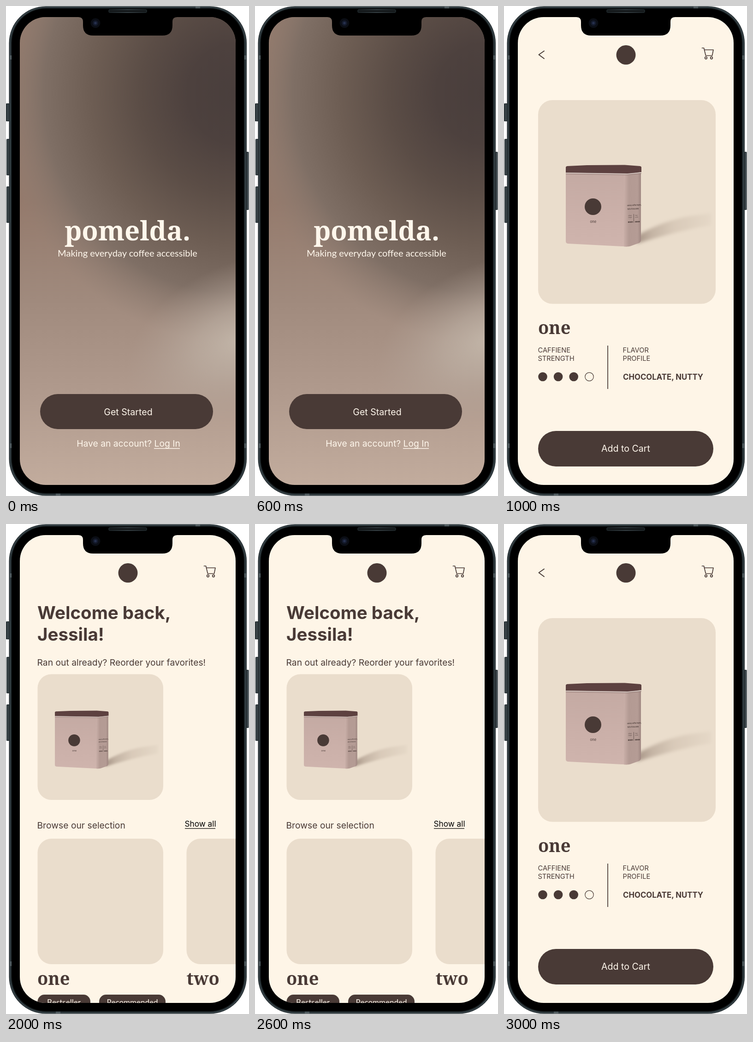
Write an HTML page that moves like this. It is 527 px wide and 1062 px high and loops after 4 s.

```html
<!DOCTYPE html>
<html lang="en">
<head>
<meta charset="utf-8">
<title>Coffee app</title>
<style>
  html, body { margin: 0; width: 100%; height: 100%; overflow: hidden; background: #fff; }
  svg { display: block; width: 100vw; height: 100vh; }
  text { font-family: Inter, sans-serif; font-size: 19.3px; fill: #493a36; }
  .serif { font-family: "Noto Serif", serif; font-weight: 900; font-size: 38px; }
  .lato { font-family: Lato, sans-serif; font-size: 20.1px; }
  .mid { text-anchor: middle; }
  .light { fill: #fff7ec; }
  .btn { font-size: 19.6px; }
  .label { font-size: 14.7px; }
  .head { font-size: 38.5px; font-weight: 700; }
  .dark { fill: #493a36; }
  .card { fill: #eaddcc; }
  .line { fill: none; stroke: #493a36; stroke-width: 1.7; stroke-linejoin: round; stroke-linecap: round; }
  .tiny { font-size: 3px; }
  .note { font-size: 4.3px; font-weight: 700; }

  .scene { visibility: hidden; animation: 4s step-end infinite; }
  .welcome { animation-name: welcome; }
  .product { animation-name: product; }
  .shop { animation-name: shop; }
  @keyframes welcome { 0% { visibility: visible } 25%, 100% { visibility: hidden } }
  @keyframes product {
    0% { visibility: hidden } 25% { visibility: visible }
    50% { visibility: hidden } 75%, 100% { visibility: visible }
  }
  @keyframes shop { 0% { visibility: hidden } 50% { visibility: visible } 75%, 100% { visibility: hidden } }
</style>
</head>
<body>
<svg viewBox="0 0 527 1062" preserveAspectRatio="none">
  <defs>
    <clipPath id="screen"><rect x="30" y="24" width="468" height="1014" rx="56"/></clipPath>

    <linearGradient id="base" x2="0" y2="1">
      <stop offset="0" stop-color="#967b6c"/>
      <stop offset=".4" stop-color="#947a6c"/>
      <stop offset=".6" stop-color="#a08a7d"/>
      <stop offset=".8" stop-color="#b19b8e"/>
      <stop offset="1" stop-color="#c4ae9f"/>
    </linearGradient>
    <radialGradient id="dusk" gradientUnits="userSpaceOnUse" cx="0" cy="0" r="1"
      gradientTransform="translate(498 190) scale(520 540)">
      <stop offset="0" stop-color="#493e3c"/>
      <stop offset=".2" stop-color="#4d413e"/>
      <stop offset=".4" stop-color="#5b4d46"/>
      <stop offset=".6" stop-color="#6d5d53"/>
      <stop offset=".8" stop-color="#7f6f65"/>
      <stop offset="1" stop-color="#917f74" stop-opacity="0"/>
    </radialGradient>
    <radialGradient id="glow" gradientUnits="userSpaceOnUse" cx="0" cy="0" r="1"
      gradientTransform="translate(508 725) rotate(-25) scale(260 165)">
      <stop offset="0" stop-color="#c2b5a8"/>
      <stop offset=".4" stop-color="#bbada1" stop-opacity=".7"/>
      <stop offset="1" stop-color="#b0a095" stop-opacity="0"/>
    </radialGradient>

    <linearGradient id="front" x2="0" y2="1">
      <stop offset="0" stop-color="#c4aaa3"/>
      <stop offset=".6" stop-color="#cbb0a9"/>
      <stop offset="1" stop-color="#cfb4ad"/>
    </linearGradient>
    <linearGradient id="side">
      <stop offset="0" stop-color="#c9afa8"/>
      <stop offset=".3" stop-color="#b39a93"/>
      <stop offset=".8" stop-color="#b59c95"/>
      <stop offset="1" stop-color="#a08882"/>
    </linearGradient>
    <linearGradient id="shade">
      <stop offset="0" stop-color="#a59385"/>
      <stop offset=".2" stop-color="#c4b4a4"/>
      <stop offset=".5" stop-color="#d9cab9"/>
      <stop offset="1" stop-color="#e5d8c7"/>
    </linearGradient>
    <filter id="soft" x="-10%" y="-30%" width="120%" height="160%"><feGaussianBlur stdDeviation="3.5"/></filter>
    <linearGradient id="metal">
      <stop offset="0" stop-color="#1b2326"/>
      <stop offset=".5" stop-color="#434f54"/>
      <stop offset="1" stop-color="#1d2528"/>
    </linearGradient>

    <g id="tin">
      <path d="M288 515 L292 496 Q345 466 400 456 L449 449 V475 Q390 484 288 515Z" fill="url(#shade)" filter="url(#soft)"/>
      <path d="M134 361 H267 V521.5 L139 515 Q134 514.5 134 510Z" fill="url(#front)"/>
      <path d="M260 361 H297 V507 Q297 512 292 514 L274 520.5 Q269 522 260 521.2Z" fill="url(#side)"/>
      <path d="M134 350 Q134 347.500 137 347 L180 345 L262 344.500 L295 347 Q298 347.500 298 350 V360 L268 363 L134 361Z" fill="#5d4140"/>
      <path d="M134 362 L267 364.300 L298 361.200" fill="none" stroke="#d5c9c3" stroke-width="1.500"/>
      <path d="M134 364 L267 366 L298 363" fill="none" stroke="#8a716c" stroke-width=".8"/>
      <circle class="dark" cx="193" cy="435" r="18"/>
      <text class="mid" x="193.500" y="469.500" style="font-size:7.500px">one</text>
      <g transform="matrix(.7 -.03 0 1 267 433.500)">
        <text class="note">savory coffee beans,</text>
        <text class="note" x="1" y="8">hint of chocolate</text>
        <text class="tiny" x="3" y="22">caffeine</text>
        <text class="tiny" x="3" y="26">strength</text>
        <text class="tiny" x="25" y="22">flavor</text>
        <text class="tiny" x="25" y="26">profile</text>
        <path d="M20.500 18V37" stroke="#493a36" stroke-width=".8"/>
        <path d="M3 35H17M25 35H39" stroke="#493a36" stroke-width="2.600" stroke-dasharray="2.600 1.200"/>
      </g>
    </g>

    <g id="bar">
      <rect width="527" height="1062" fill="#fef5e7"/>
      <circle class="dark" cx="264.500" cy="106" r="21"/>
      <g class="line">
        <path d="M429.500 91H433.500L437.500 107.500H451.500L454 95H434.500"/>
        <circle cx="438" cy="112.500" r="2.300"/>
        <circle cx="450" cy="112.500" r="2.300"/>
      </g>
    </g>
  </defs>

  <!-- phone -->
  <g fill="#30393d">
    <rect x="0" y="211" width="9" height="39" rx="1.500"/>
    <rect x="1" y="288" width="8" height="79" rx="1.500"/>
    <rect x="1" y="391" width="8" height="79" rx="1.500"/>
    <rect x="520" y="316" width="6.500" height="126" rx="1.500"/>
  </g>
  <path d="M4.500 213V248M4.500 290V365M4.500 393V468M524 318V440" stroke="#4a575c" stroke-width="1.200"/>
  <rect x="6.500" y=".5" width="515.500" height="1061" rx="80" fill="#1d2528"/>
  <rect x="9" y="2.500" width="510.500" height="1057" rx="78" fill="none" stroke="#3c484d" stroke-width="2"/>
  <path d="M411 3H421M108 1059H118M10 107V116M519 107V116M10 948V958M519 948V958" stroke="#515c60" stroke-width="4"/>
  <rect x="12.500" y="5.500" width="503.500" height="1050.500" rx="74" fill="#000"/>

  <g clip-path="url(#screen)">
    <g class="scene welcome">
      <rect width="527" height="1062" fill="url(#base)"/>
      <rect width="527" height="1062" fill="url(#dusk)"/>
      <rect width="527" height="1062" fill="url(#glow)"/>
      <text class="serif mid light" x="263.500" y="508" style="font-size:58px">pomelda.</text>
      <text class="lato mid light" x="263.500" y="543">Making everyday coffee accessible</text>
      <rect class="dark" x="74" y="841" width="375" height="76" rx="38"/>
      <text class="btn mid light" x="265" y="886.500">Get Started</text>
      <text class="mid light" x="265.500" y="955">Have an account? Log In</text>
      <path d="M321 959H377" stroke="#fff7ec" stroke-width="1.300"/>
    </g>

    <g class="scene product">
      <use href="#bar"/>
      <path class="line" d="M87 97.500L75.500 105.500L87 114" style="stroke-width:2"/>
      <rect class="card" x="74" y="204" width="385" height="441.500" rx="31"/>
      <use href="#tin"/>
      <text class="serif" x="74" y="711">one</text>
      <text class="label" x="73.500" y="750.500">CAFFIENE</text>
      <text class="label" x="73.500" y="768.500">STRENGTH</text>
      <g class="dark">
        <circle cx="84" cy="803.500" r="9.800"/>
        <circle cx="117.600" cy="803.500" r="9.800"/>
        <circle cx="151.200" cy="803.500" r="9.800"/>
      </g>
      <circle class="line" cx="185" cy="803.500" r="9.200" style="stroke-width:1.200"/>
      <rect class="dark" x="224.200" y="736" width="1.700" height="94"/>
      <text class="label" x="257.500" y="750.500">FLAVOR</text>
      <text class="label" x="257.500" y="768.500">PROFILE</text>
      <text x="258" y="809.500" style="font-size:16.800px;font-weight:700">CHOCOLATE, NUTTY</text>
      <rect class="dark" x="74" y="921" width="380" height="77" rx="38.500"/>
      <text class="btn mid light" x="264" y="966">Add to Cart</text>
    </g>

    <g class="scene shop">
      <use href="#bar"/>
      <text class="head" x="68" y="205.500">Welcome back,</text>
      <text class="head" x="68" y="252.500">Jessila!</text>
      <text x="67.500" y="307">Ran out already? Reorder your favorites!</text>
      <rect class="card" x="68.500" y="325.500" width="272.500" height="272.500" rx="30"/>
      <use href="#tin" transform="translate(10.900 160) scale(.71)"/>
      <text x="67.500" y="659.500">Browse our selection</text>
      <text x="387.500" y="656" style="font-size:17.200px;fill:#000">Show all</text>
      <path d="M388 659.800H454" stroke="#000" stroke-width="1.200"/>
      <rect class="card" x="68.500" y="682" width="272.500" height="272" rx="30"/>
      <rect class="card" x="391.500" y="682" width="272.500" height="272" rx="30"/>
      <text class="serif" x="68" y="999">one</text>
      <text class="serif" x="391.500" y="999">two</text>
      <rect class="dark" x="68.500" y="1020" width="114.500" height="34" rx="15"/>
      <rect class="dark" x="202" y="1020" width="144" height="34" rx="15"/>
      <text class="lato mid light" x="125.500" y="1042.500" style="font-size:17px">Bestseller</text>
      <text class="lato mid light" x="274" y="1042.500" style="font-size:17px">Recommended</text>
    </g>
  </g>

  <!-- notch -->
  <path d="M157 20V24Q167 24 167 34V42Q167 64 189 64H339Q361 64 361 42V34Q361 24 371 24V20Z"/>
  <rect x="222" y="7" width="84" height="8" rx="4" fill="url(#metal)"/>
  <rect x="224" y="8.500" width="80" height="5" rx="2.500" fill="#15191b"/>
  <circle cx="194" cy="37" r="10.500" fill="#0b0e15"/>
  <circle cx="194" cy="37" r="6" fill="#141a2b"/>
  <circle cx="194" cy="37" r="2.800" fill="#26304d"/>
</svg>
</body>
</html>
```
